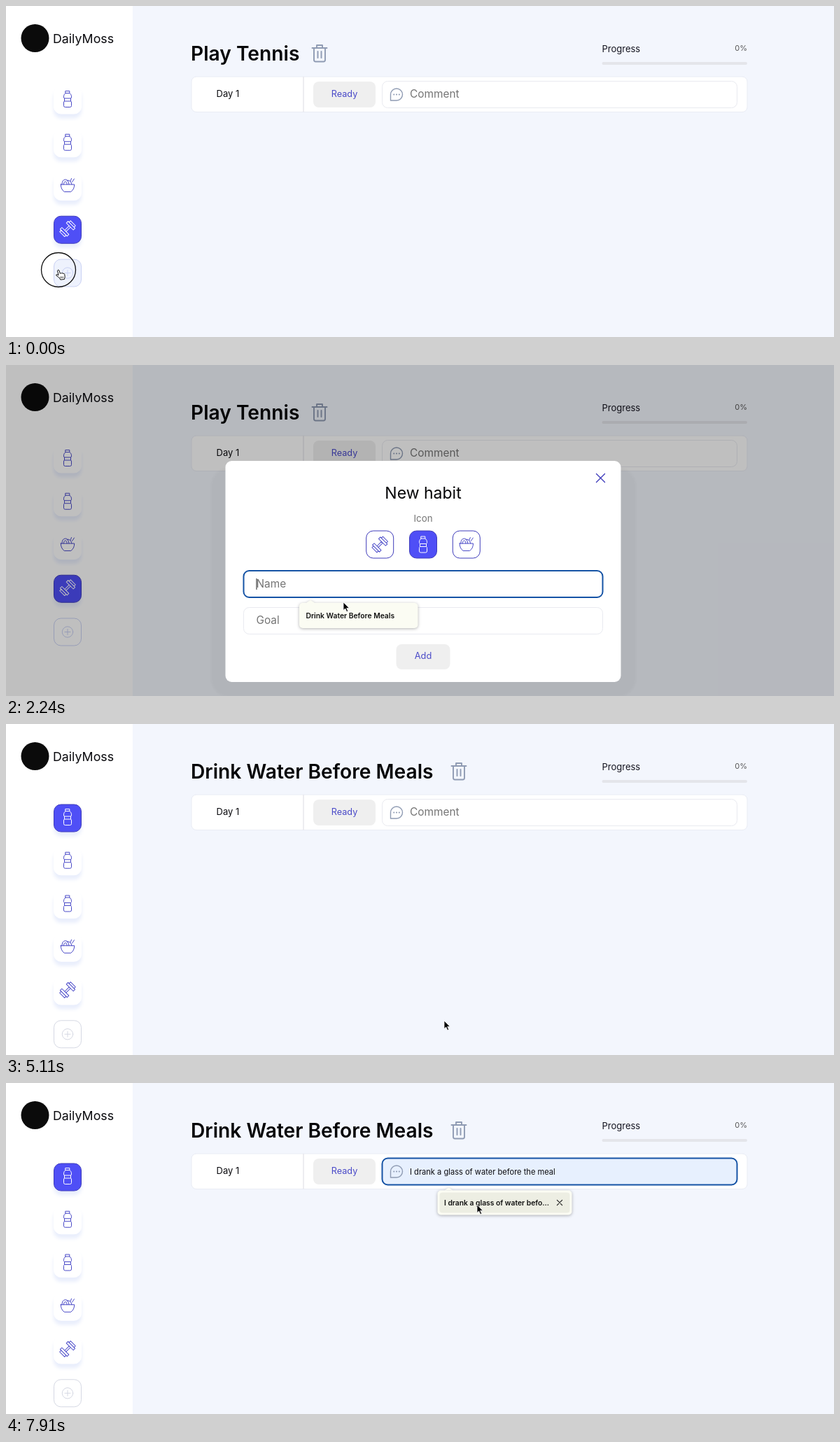
An HTML page that plays this animation: 1183x473 px, repeating every 8 s.

```html
<!DOCTYPE html>
<html lang="en">
<head>
<meta charset="utf-8">
<title>Habit tracker</title>
<style>
  html, body { margin: 0; width: 100%; height: 100%; overflow: hidden; background: #f3f6fd; }
  svg { display: block; font-family: Inter, "Open Sans", sans-serif; }
  .lift { filter: drop-shadow(0 6px 2.5px #e9eefc); }
  .popup { filter: drop-shadow(0 1px 2px rgba(0, 0, 0, .3)); }
  .line { fill: none; stroke-linecap: round; stroke-linejoin: round; }
</style>
</head>
<body>
<svg id="stage" width="1183" height="473" viewBox="0 0 1183 473"></svg>
<script>
const LOOP = 8000, STEP = 70;
const BLUE = '#4f4ff6', INK = '#4a4ac8', EDGE = '#3f3cbb', GREY = '#757575', FILLED = '#e7f0fe', FOCUS = '#1553a5';
const HABIT = 'Drink Water Before Meals';
const stage = document.getElementById('stage');

// Icons are drawn around their own centre.
const icons = {
  bottle: '<path d="M-2.8-11.5h5.6v3h-5.6zM-2.8-8.5C-5-7-5.5-5.5-5.5-3q0 1.5 1 2v4q-1 .5-1 2v4.5q0 2 2 2h7q2 0 2-2V5q0-1.5-1-2v-4q1-.5 1-2C5.5-5.5 5-7 2.8-8.5M-4.5-1h9M-4.5 3h9"/>',
  bowl: '<path d="M-9.7-1.5h19.4q0 7-5 10.5h-9.4q-5-3.5-5-10.5zM-8-1.5q0-6.5 4.5-7t5.5 7M-5.5-1.5q0-4 2.300-4t2.300 4M-1-7q5-2 7 5.500M4-6l1.500-4M6.500-5l3-4.500"/>',
  dumbbell: '<path transform="rotate(-45)" d="M-4.500-1.300h9v2.600h-9zM4.500-7h3.500v14h-3.500zM8-5h3v10h-3zM-8-7h3.500v14h-3.500zM-11-5h3v10h-3z"/>',
  plus: '<circle r="7.700"/><path d="M-4 0h8M0-4v8"/>',
  trash: '<path d="M-10.500-7.500h21M-4-7.500v-4h8v4M-8-7.500v17q0 2.500 2.500 2.500h11q2.500 0 2.500-2.500v-17M-2.500-2.500v9M2.500-2.500v9"/>',
  chat: '<path d="M-8.500 8.500v-8.500a8.500 8.500 0 1 1 8.500 8.500z"/><path d="M-3.800 0h.1M0 0h.1M3.800 0h.1" stroke-width="2"/>',
  cross: '<path d="M-6-6l12 12M6-6l-12 12"/>'
};

const icon = (name, x, y, color, width = 1) =>
  `<g class="line" transform="translate(${x} ${y})" stroke="${color}" stroke-width="${width}">${icons[name]}</g>`;
const rect = (x, y, w, h, r, fill, extra = '') =>
  `<rect x="${x}" y="${y}" width="${w}" height="${h}" rx="${r}" fill="${fill}" ${extra}/>`;
const text = (s, x, y, size, fill = '#0b0b0f', weight = 400, anchor = 'start') =>
  `<text x="${x}" y="${y}" font-size="${size}" fill="${fill}" font-weight="${weight}" text-anchor="${anchor}">${s}</text>`;
const inside = (p, x, y, w, h) => p.x > x && p.x < x + w && p.y > y && p.y < y + h;
const caret = (x, y) => rect(x, y, 1, 16, 0, '#222');

function field(x, y, w, focused, filled) {
  const border = focused ? `stroke="${FOCUS}" stroke-width="2"` : `stroke="${filled ? FILLED : '#e9eaf0'}"`;
  return rect(x + .5, y + .5, w - 1, 38, 8, filled ? FILLED : '#fff', border);
}

// Pointer stops: time, x, y and an optional control point for a curved approach.
const stops = [
  [0, 75, 377], [280, 75, 377], [1120, 597, 258, 520, 377], [1330, 597, 258],
  [1890, 482, 313], [2030, 482, 313], [2240, 482, 339], [2450, 483, 353], [2730, 483, 353],
  [2870, 482, 368], [2940, 483, 369], [4340, 483, 369], [4830, 626, 424], [5390, 626, 424],
  [5600, 650, 347], [5670, 650, 347], [6510, 599, 113, 759, 330], [6580, 599, 113],
  [6930, 600, 118], [7490, 600, 118], [7910, 673, 174], [LOOP, 673, 174]
];

function pointerAt(t) {
  const i = stops.findIndex(s => s[0] > t);
  const [t0, x0, y0] = stops[i - 1];
  const [t1, x1, y1, cx = (x0 + x1) / 2, cy = (y0 + y1) / 2] = stops[i];
  const u = (t - t0) / (t1 - t0), k = u * u * (3 - 2 * u);
  const mix = (a, c, b) => (1 - k) ** 2 * a + 2 * k * (1 - k) * c + k * k * b;
  return { x: mix(x0, cx, x1), y: mix(y0, cy, y1) };
}

const cursors = {
  arrow: '<path d="M0 0v11.500l2.700-2.400 2 4.500 2-.9-2-4.300h3.700z" fill="#000" stroke="#fff" stroke-width=".8"/>',
  beam: '<path class="line" d="M-2.500-6.500q2.500 0 2.500 1.500v10q0 1.500-2.500 1.500M2.500-6.500q-2.500 0-2.500 1.500M2.500 6.500q-2.500 0-2.500-1.500M-1.500 1.500h3" stroke="#222"/>',
  hand: '<path d="M-1.500 1q1.500-2 2.500 0l1.300 4.500 1.200-1 1.200.6 1.300-.5 1 .8q1.500-.3 1.800 1.200l.4 3.400-.8 3.500-5.600.6-1.500-2.600-4.600-3.500q-.3-2 2-1l1.300.8z" fill="#fff" stroke="#111"/><path d="M2.800 9.500v2.500M4.600 9.500v2.500M6.400 9.500v2.500" stroke="#111" stroke-width=".7"/>'
};

function sideButton(name, i, active) {
  const y = 134.5 + 61.75 * i;
  return rect(68.5, y - 19.5, 39, 39, 10, active ? BLUE : '#fff', `class="lift" stroke="${active ? EDGE : '#fff'}"`) +
    icon(name, 88, y - 1.5, active ? '#fff' : INK);
}

function page(t, added) {
  const habits = added ? ['bottle', 'bottle', 'bottle', 'bowl', 'dumbbell'] : ['bottle', 'bottle', 'bowl', 'dumbbell'];
  const plusY = 134.5 + 61.75 * habits.length;
  const edge = added ? '#d5d8e3' : '#c9d1f3';
  const typed = t >= 7770, focused = t >= 7070;
  return rect(0, 0, 1183, 473, 0, '#f3f6fd') + rect(0, 0, 181, 473, 0, '#fff') +
    '<circle cx="41.500" cy="46" r="20" fill="#0b0b0b"/>' + text('DailyMoss', 67, 52.5, 17.8) +
    habits.map((h, i) => sideButton(h, i, i === (added ? 0 : 3))).join('') +
    rect(68.5, plusY - 19.5, 39, 39, 10, t < STEP ? '#eef2fd' : '#fff', `stroke="${edge}"`) +
    icon('plus', 88, plusY, edge) +
    text(added ? HABIT : 'Play Tennis', 264, 78, 28.2, '#050507', 600) +
    icon('trash', added ? 647 : 448, 67.5, '#8f9bb3', 1.9) +
    text('Progress', 851.5, 66, 13, '#14141f') + text('0%', 1059, 64, 11, '#555', 400, 'end') +
    rect(851.5, 80, 207.5, 4, 2, '#e4e5ea') +
    rect(265, 101, 794, 50.5, 7, '#fff', 'stroke="#e9ecf4"') + rect(424.3, 101, 1.4, 50.5, 0, '#e5e6ec') +
    text('Day 1', 300.5, 130, 13) +
    rect(439, 108, 89, 37, 8, '#efefef') + text('Ready', 483.5, 130, 12.7, INK, 400, 'middle') +
    field(537, 107, 508, focused, typed) + icon('chat', 558, 126.5, '#8f9bb3', 1.4) +
    (typed ? text('I drank a glass of water before the meal', 577, 131, 11.1) : text('Comment', 577, 131, 15.4, GREY)) +
    (focused && !typed ? caret(577, 118) : '');
}

function iconChoice(name, x, active) {
  return rect(x - 19.5, 237, 39, 39, 10, active ? BLUE : '#fff', `stroke="${EDGE}"`) +
    icon(name, x, 256.5, active ? '#fff' : INK);
}

function modal(t, p) {
  const onName = t >= 1890 && t < 3080, onGoal = t >= 3080 && t < 4970;
  const preview = t >= 2450 && t < 2660, named = t >= 2660;
  const goal = t >= 4200 ? '30' : t >= 3850 ? '3' : '';
  const pick = t >= 1260 ? 'bottle' : 'dumbbell';
  const spinner = rect(822, 357, 12, 17, 2, '#efefef') +
    '<path d="M824.500 363.500l3-3.500 3 3.500zM824.500 368l3 3.500 3-3.500z" fill="#444"/>';
  const blink = onGoal && !(t >= 3640 && t < 3850);
  return `<g opacity="${t < 140 ? .5 : 1}">` + rect(0, 0, 1183, 473, 0, 'rgba(0,0,0,.25)') +
    rect(293, 147, 607, 327, 26, 'rgba(0,0,0,.025)', 'style="filter:blur(1.5px)"') +
    rect(313.5, 137, 565, 316, 9, '#fff') + icon('cross', 849.5, 161.5, EDGE, 1.4) +
    text('New habit', 596, 191, 23, '#050507', 400, 'middle') +
    text('Icon', 596, 224, 13.3, GREY, 400, 'middle') +
    ['dumbbell', 'bottle', 'bowl'].map((n, i) => iconChoice(n, 534.2 + 61.8 * i, n === pick)).join('') +
    field(339, 293.5, 514, onName, preview || named) +
    (named ? text(HABIT, 357.5, 318, 15.2) : preview ? text(HABIT, 357.5, 317, 11.1) : text('Name', 357.5, 318, 15.4, GREY)) +
    (t >= 1960 && t < 2450 ? caret(357.5, 305) : '') +
    field(339, 346, 514, onGoal, false) +
    (goal ? text(goal, 357.5, 370, 14) : text('Goal', 357.5, 370, 15.4, GREY)) +
    (blink ? caret(357.5 + 8.8 * goal.length, 357.5) : '') +
    (onGoal || inside(p, 339, 346, 514, 39) ? spinner : '') +
    rect(557.5, 399, 77, 36, 8, inside(p, 557, 398, 78, 38) ? '#dcd9fd' : '#efefef') +
    text('Add', 596, 420, 12.8, INK, 400, 'middle') + '</g>';
}

function suggestion(s, x, y, w, h, active, closable) {
  return '<g class="popup">' + rect(x, y, w, h, 5, '#fbfcf3') +
    `<path d="M${x + 10} ${y}l6-4 6 4z" fill="#fbfcf3"/></g>` +
    (active ? rect(x + 3, y + 3, w - 6, h - 6, 4, '#edeee3') : '') +
    text(s, x + 9.5, y + h / 2 + 3.7, 10.3, '#111', 600) +
    (closable ? `<g transform="translate(${x + w - 17.5} ${y + h / 2}) scale(.6)" class="line" stroke="#222" stroke-width="2">${icons.cross}</g>` : '');
}

function pointer(t, p, open) {
  if (t >= 3850 && t < 4410) return '';
  const overField = open
    ? inside(p, 339, 294, 514, 39) || inside(p, 339, 346, 514, 39) && !(t >= 1960 && t < 2660)
    : inside(p, 537, 107, 508, 39);
  const overIcon = t < 140 || open && inside(p, 576, 237, 40, 40);
  const kind = overIcon ? 'hand' : overField ? 'beam' : 'arrow';
  const ring = t < STEP || t >= 1190 && t < 1260;
  return (ring ? `<circle cx="${p.x}" cy="${p.y}" r="24.500" fill="none" stroke="#111" stroke-width="1.300"/>` : '') +
    `<g transform="translate(${p.x} ${p.y})">${cursors[kind]}</g>`;
}

function render(t) {
  const p = pointerAt(t), added = t >= 5110, open = t >= STEP && !added;
  stage.innerHTML = page(t, added) + (open ? modal(t, p) : '') +
    (t >= 1960 && t < 2660 ? suggestion(HABIT, 419, 340, 169.5, 36, t >= 2380) : '') +
    (t >= 7210 ? suggestion('I drank a glass of water befo...', 616.5, 153.5, 192, 35, t >= 7770, true) : '') +
    pointer(t, p, open);
}

let shown = -1;
function tick(now) {
  const t = Math.floor(now % LOOP / STEP) * STEP;
  if (t !== shown) render(shown = t);
  requestAnimationFrame(tick);
}
tick(performance.now());
</script>
</body>
</html>
```
